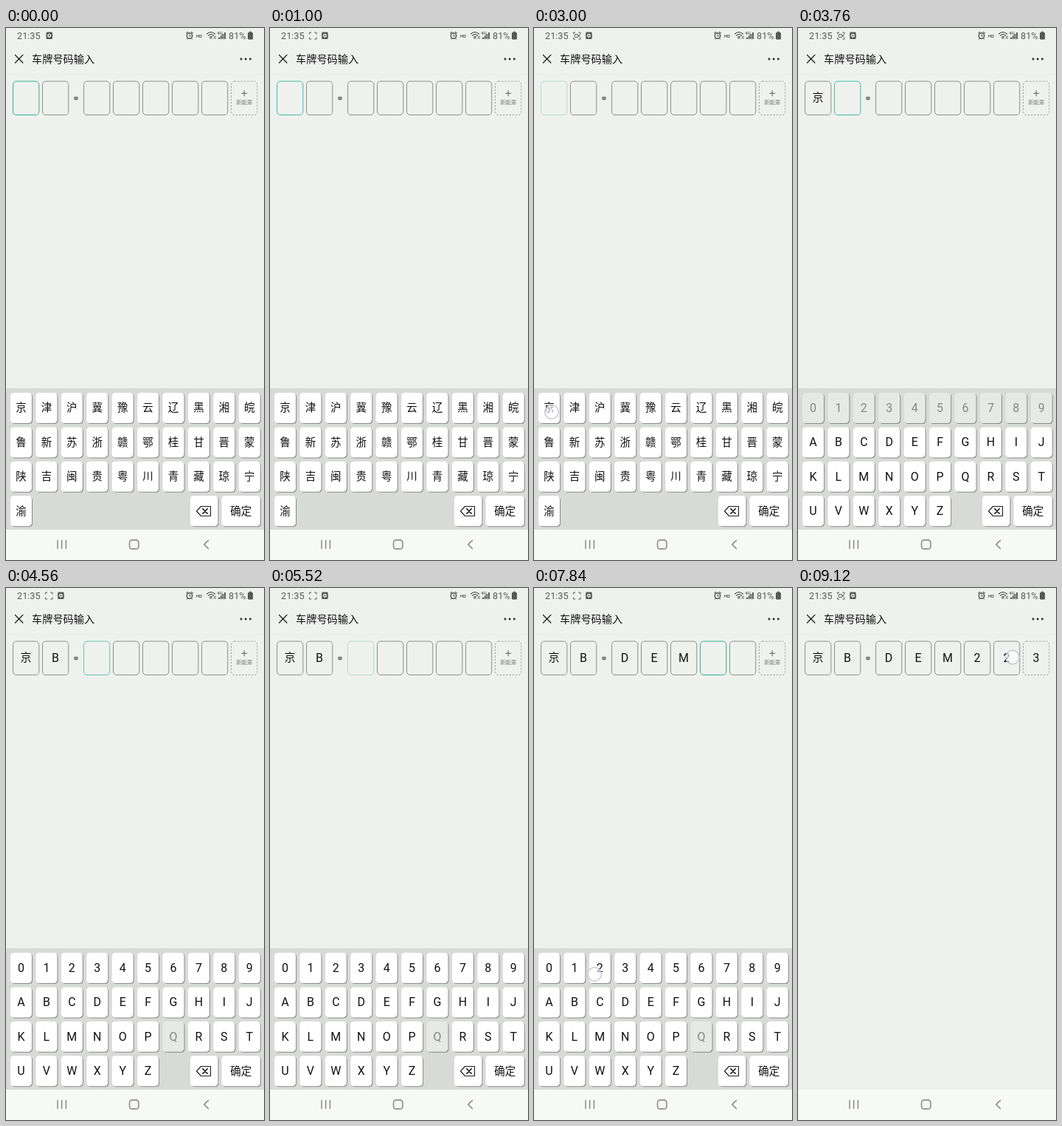
An HTML page for the animation above (9160 ms loop, 350x719 px).

```html
<!DOCTYPE html>
<html lang="zh-CN">
<head>
<meta charset="utf-8">
<title>车牌号码输入</title>
<style>
html, body { margin: 0; width: 100%; height: 100%; overflow: hidden; background: #eff1ef; }
svg { display: block; width: 350px; height: 719px; }
text { font-family: Roboto, "Noto Sans CJK SC", "Noto Sans CJK", sans-serif; text-anchor: middle; fill: #111; }
.start { text-anchor: start; }
.key { filter: drop-shadow(1px 1.5px 0.7px rgba(0, 0, 0, .36)); }
.line { fill: none; stroke-linecap: round; stroke-linejoin: round; }
</style>
</head>
<body>
<svg id="stage" viewBox="0 0 350 719"></svg>
<script>
const LOOP = 9160, PULSE = 1200;
const cellX = [9.5, 49.5, 105.5, 145.5, 185.5, 225.5, 265.5, 305.5];
const plate = '京BDEM223';
// Time at which each character lands in its cell.
const typed = [3070, 4360, 5840, 6660, 7220, 8000, 8280, 8560];
const closeAt = 8720, iconAt = 240;
// Finger marks: from, to, x, y.
const touches = [
  [2960, 3160, 24, 519], [4280, 4480, 56, 566], [5740, 5940, 124, 578],
  [6540, 6740, 157, 570], [7020, 7300, 88, 608], [7760, 8080, 82, 522],
  [8180, 8340, 84, 521], [8460, 8620, 120, 521], [8640, 8800, 318, 656],
  [9000, 9160, 291, 93.5]
];

const rect = (x, y, w, h, r, attr) =>
  `<rect x="${x}" y="${y}" width="${w}" height="${h}" rx="${r}" ${attr}/>`;
const text = (x, y, size, str, attr = '') =>
  `<text x="${x}" y="${y}" font-size="${size}" ${attr}>${str}</text>`;
const path = (d, color, width = 1, attr = '') =>
  `<path class="line" d="${d}" stroke="${color}" stroke-width="${width}" ${attr}/>`;
const group = (id, body) => `<g id="${id}">${body}</g>`;

function key(x, y, w, label, off, size = 14.5) {
  const base = size > 15 ? 5.8 : 5.4;
  return rect(x, y, w, 41, 4.5, `class="key" fill="${off ? '#e7e9e7' : '#fefffe'}"`) +
    text(x + w / 2, y + 20 + base, size, label, off ? 'style="fill:#858785"' : '');
}

function keyboard(rows, off) {
  let out = rect(0, 487, 350, 191, 0, 'fill="#d8dad8"');
  rows.forEach((row, r) => [...row].forEach((ch, c) => {
    out += key(6 + c * 34.42, 493 + r * 46.4, 29, ch, off.includes(ch), ch < '\u0100' ? 16 : 14.5);
  }));
  out += key(250, 632.2, 37.5, '', false) + key(292.5, 632.2, 52.5, '确定', false);
  out += path('M258.5 653L264.5 646.5H277.5V659.5H264.5Z', '#222', 1.2) +
    path('M266.8 649.8L273.2 656.2M273.2 649.8L266.8 656.2', '#111', 1.6);
  return out;
}

function statusBar() {
  const ink = '#555956';
  const square = rect(54.5, 5.5, 8.5, 9.5, 1.5, `fill="${ink}"`) +
    '<circle cx="58.7" cy="10.2" r="2.5" fill="#eff1ef"/>' +
    `<circle cx="58.7" cy="10.2" r="1.1" fill="${ink}"/>`;
  const brackets = path('M53.5 8V6H55.7M60.8 6H63V8M63 13V15H60.8M55.7 15H53.5V13', ink, 1);
  const camera = rect(55.3, 8.5, 4.4, 4, .8, `fill="none" stroke="${ink}"`) +
    path('M60.3 10L61.8 9V12L60.3 11', ink, .8);
  const bars = [0, 1, 2, 3].map(i =>
    rect(288 + i * 2.7, 12.5 - i * 2.2, 1.9, 2.5 + i * 2.2, 0, `fill="${ink}"`)).join('');
  const grey = `style="fill:${ink}"`;
  return text(15, 15, 12.7, '21:35', `class="start" ${grey}`) +
    group('square', square) + group('brackets', brackets) + group('camera', camera) +
    `<circle cx="249" cy="10.5" r="3.7" fill="none" stroke="${ink}" stroke-width="1.5"/>` +
    path('M249 8.7V10.8H250.7M244.7 7L246.7 5.4M253.3 7L251.3 5.4M246.3 14L245.5 15M251.7 14L252.5 15', ink, 1.1) +
    text(262, 12.6, 6, 'HD', `font-weight="700" ${grey}`) +
    path('M272.5 8Q278 3.2 283.5 8M274.5 10.3Q278 7 281.5 10.3M276.4 12.4Q278 10.8 279.6 12.4', ink, 1.2) +
    `<circle cx="278" cy="14" r="1" fill="${ink}"/>` +
    path('M282.4 14.5V11M284.3 11V14.5', ink, .8) +
    text(290, 8.8, 6, '4G', `font-weight="500" ${grey}`) + bars +
    text(302, 15, 12.7, '81%', `class="start" ${grey}`) +
    rect(328, 6, 7, 9.5, 1, `fill="${ink}"`) + rect(330, 4.7, 3, 2, 0, `fill="${ink}"`);
}

function header() {
  return path('M12.5 36.5L22.8 47M22.8 36.5L12.5 47', '#222', 1.3) +
    text(35, 47.2, 14.2, '车牌号码输入', 'class="start" font-weight="500"') +
    [319, 325.2, 331.4].map(x => `<circle cx="${x}" cy="42" r="1.4" fill="#222"/>`).join('') +
    rect(0, 62, 350, 1, 0, 'fill="#eaecea"');
}

function cells() {
  return cellX.map((x, i) => {
    const dash = i === 7 ? 'stroke-dasharray="2.5 1.8"' : '';
    const box = (id, color) =>
      rect(x, 72, 35.3, 45.5, 4.5, `id="${id}${i}" fill="none" stroke="${color}" ${dash}`);
    return box('idle', i === 7 ? '#a3a5a3' : '#8d8f8d') + box('live', '#26b493') +
      text(x + 17.6, i ? 99.7 : 99, i ? 16 : 15, plate[i], `id="char${i}"`);
  }).join('') +
    '<ellipse cx="95" cy="95" rx="3" ry="2.6" fill="#868886"/>' +
    group('plus', path('M319.7 88.3H326.7M323.2 84.8V91.8', '#727472', 1.2) +
      text(323.2, 103.2, 7.3, '新能源', 'style="fill:#777977"'));
}

function navBar() {
  const ink = '#7b7e7c';
  return rect(0, 678, 350, 41, 0, 'fill="#f7f9f7"') +
    path('M70 692.5V703.5M75.7 692.5V703.5M81.4 692.5V703.5', ink, 1.3) +
    rect(167.5, 692, 12.5, 12, 3.8, `fill="none" stroke="${ink}" stroke-width="1.4"`) +
    path('M274.5 692.5L268.7 698L274.5 703.5', ink, 1.4);
}

const stage = document.getElementById('stage');
const provinces = ['京津沪冀豫云辽黑湘皖', '鲁新苏浙赣鄂桂甘晋蒙', '陕吉闽贵粤川青藏琼宁', '渝'];
const latin = ['0123456789', 'ABCDEFGHIJ', 'KLMNOPQRST', 'UVWXYZ'];
stage.innerHTML = rect(0, 0, 350, 719, 0, 'fill="#eff1ef"') + statusBar() + header() + cells() +
  group('kb0', keyboard(provinces, '')) +
  group('kb1', keyboard(latin, '0123456789')) +
  group('kb2', keyboard(latin, 'Q')) + navBar() +
  '<circle id="touch" r="9.3" fill="#fff" fill-opacity=".6" stroke="#c3c2d8" stroke-width="1.3"/>';

const el = id => document.getElementById(id);
const show = (id, on) => { el(id).style.display = on ? '' : 'none'; };

// CSS "ease" curve, solved by bisection.
function ease(p) {
  const bez = (a, b, u) => 3 * a * u * (1 - u) ** 2 + 3 * b * u * u * (1 - u) + u ** 3;
  let lo = 0, hi = 1;
  for (let i = 0; i < 18; i++) {
    const mid = (lo + hi) / 2;
    if (bez(.25, .25, mid) < p) lo = mid; else hi = mid;
  }
  return bez(.1, 1, lo);
}

function pulse(age) {
  const p = (age % PULSE) / PULSE * 2;
  return .3 + .7 * (p < 1 ? ease(p) : 1 - ease(p - 1));
}

function draw(t) {
  const count = typed.filter(at => t >= at).length;
  const open = t < closeAt;
  const since = count ? typed[count - 1] : -500;
  plate.split('').forEach((_, i) => {
    const live = open && i === count;
    show('char' + i, i < count);
    show('idle' + i, !live);
    show('live' + i, live);
    if (live) el('live' + i).style.opacity = pulse(t - since);
  });
  show('plus', count < 7);
  [0, 1, 2].forEach(k => show('kb' + k, open && k === Math.min(count, 2)));

  const recording = t >= iconAt;
  show('brackets', recording);
  show('camera', t >= 1640 && (t - 1640) % 1060 < 360);
  el('square').setAttribute('transform', `translate(${recording ? 15.7 : 0})`);

  const hit = touches.find(([from, to]) => t >= from && t < to);
  show('touch', !!hit);
  if (hit) {
    const [from, to, x, y] = hit;
    el('touch').setAttribute('cx', x);
    el('touch').setAttribute('cy', y);
    el('touch').style.opacity = Math.min(1, (t - from + 20) / 60, (to - t + 20) / 60);
  }
}

const begin = performance.now();
function tick() {
  draw((performance.now() - begin) % LOOP);
  requestAnimationFrame(tick);
}
tick();
</script>
</body>
</html>
```
